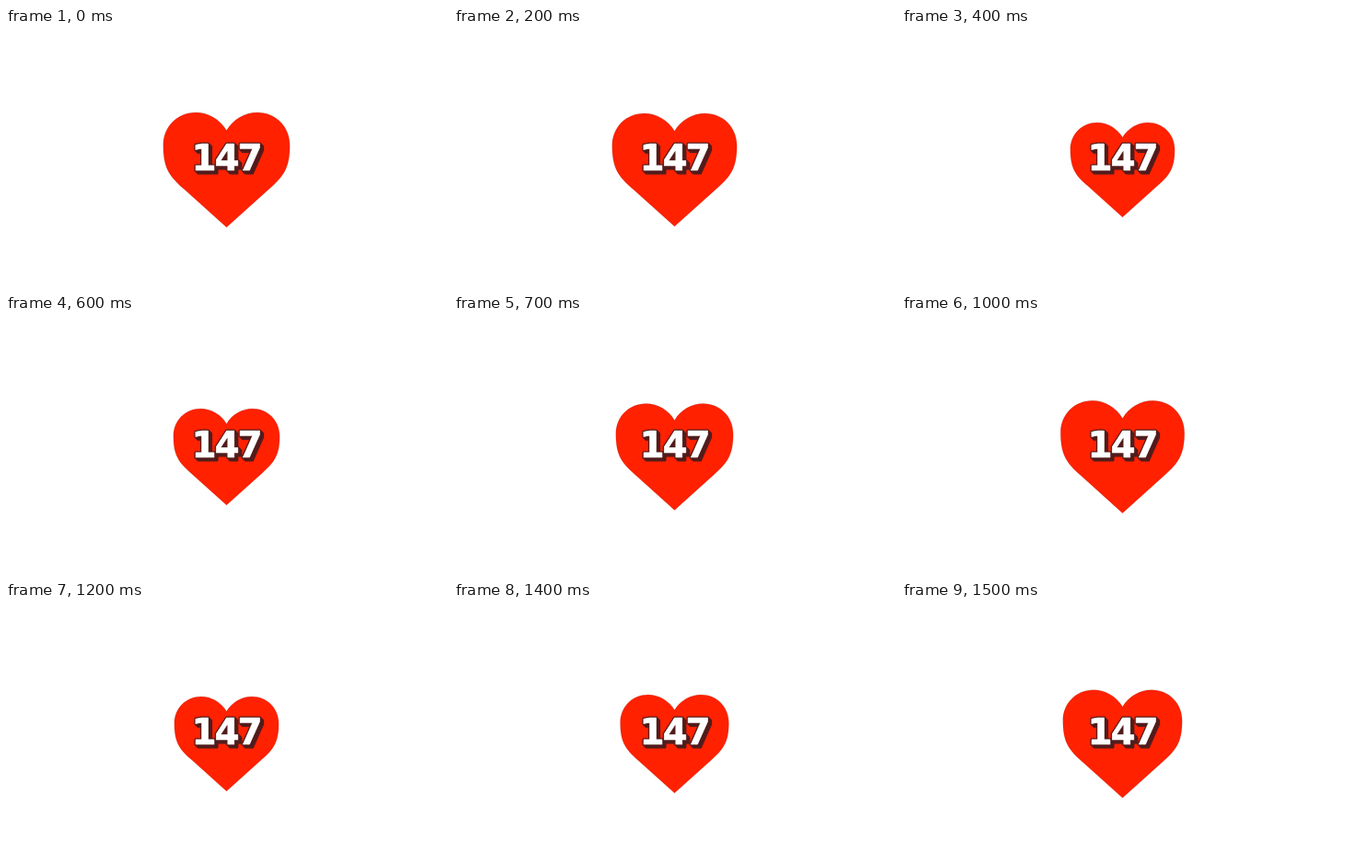
Recreate the animation shown at these times as an HTML page. Size 480x282 px, loop 1600 ms.

```html
<!DOCTYPE html>
<html lang="en">
<head>
<meta charset="utf-8">
<title>Beating heart</title>
<style>
  html, body { margin: 0; width: 100%; height: 100%; overflow: hidden; background: #fff; }
  svg { display: block; width: 480px; height: 282px; }
  text { font: bold 39px "DejaVu Sans", sans-serif; letter-spacing: -2.1px; stroke-linejoin: round; }
  .shade { fill: #521c1c; stroke: #521c1c; stroke-width: 3.2; }
  .face { fill: #fff; stroke: #fff; stroke-width: .6; }
</style>
</head>
<body>
<svg viewBox="0 0 480 282">
  <path id="heart" fill="#ff2100" stroke="#501000" stroke-opacity=".3" stroke-width=".5"
    d="M0 -43C-7 -55 -20 -62.5 -33.5 -62.5C-53.5 -62.5 -68.7 -47 -68.7 -27C-68.7 -2 -62 7 -46 21L0 62.5L46 21C62 7 68.7 -2 68.7 -27C68.7 -47 53.5 -62.5 33.5 -62.5C20 -62.5 7 -55 0 -43Z"/>
  <g id="count"></g>
</svg>
<script>
  const LOOP = 1600, STEP = 100, BASE = 137;
  // Heart width at each step of the beat
  const widths = [137, 139.5, 135, 124, 113, 110.5, 115, 127,
                  138, 139.5, 134, 123, 113, 110.5, 117.5, 129];
  const heart = document.getElementById('heart');
  const count = document.getElementById('count');

  function addText(kind, shift) {
    const el = document.createElementNS('http://www.w3.org/2000/svg', 'text');
    el.setAttribute('class', kind);
    el.setAttribute('x', 201.4 + shift);
    el.setAttribute('y', 154.8 + shift);
    if (kind === 'shade') el.setAttribute('aria-hidden', 'true');
    el.textContent = '147';
    count.append(el);
  }

  for (let shift = 3; shift >= 0; shift--) addText('shade', shift);
  addText('face', 0);

  function draw(time) {
    const width = widths[Math.floor((time % LOOP) / STEP)];
    heart.setAttribute('transform', `translate(239.5 154.5) scale(${width / BASE})`);
  }

  let start;
  function tick(now) {
    start ??= now;
    draw(Math.max(0, now - start));
    requestAnimationFrame(tick);
  }
  draw(0);
  requestAnimationFrame(tick);
</script>
</body>
</html>
```
